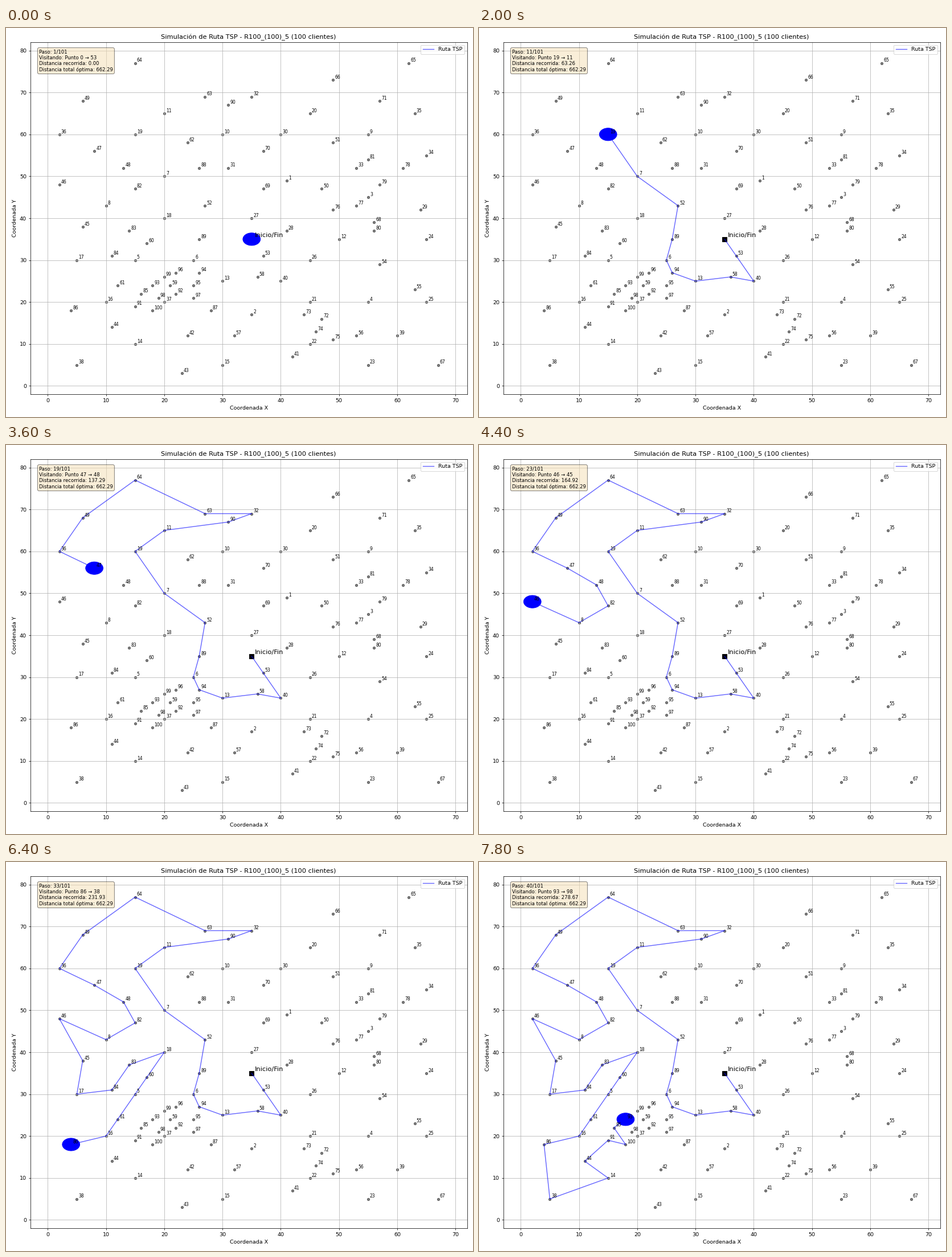
A matplotlib script for the animation above (8000 ms loop, 820 by 683 pixels).

```python
import matplotlib.pyplot as plt
import numpy as np
from matplotlib.animation import FuncAnimation
from matplotlib.patches import Circle

W, H, DPI = 820, 683, 820 / 12
STEPS, STEP_MS = 40, 200
TOTAL = 662.29

# Depot first, then customers 1 to 100
XS = [35,
      41, 35, 55, 55, 15, 25, 20, 10, 55, 30,
      20, 50, 30, 15, 30, 10, 5, 20, 15, 45,
      45, 45, 55, 65, 65, 45, 35, 41, 64, 40,
      31, 35, 53, 65, 63, 2, 20, 5, 60, 40,
      42, 24, 23, 11, 6, 2, 8, 13, 6, 47,
      49, 27, 37, 57, 63, 53, 32, 36, 21, 17,
      12, 24, 27, 15, 62, 49, 67, 56, 37, 37,
      57, 47, 44, 46, 49, 49, 53, 61, 57, 56,
      55, 15, 14, 11, 16, 4, 28, 26, 26, 31,
      15, 22, 18, 26, 25, 22, 25, 19, 20, 18]
YS = [35,
      49, 17, 45, 20, 30, 30, 50, 43, 60, 60,
      65, 35, 25, 10, 5, 20, 30, 40, 60, 65,
      20, 10, 5, 35, 20, 30, 40, 37, 42, 60,
      52, 69, 52, 55, 65, 60, 20, 5, 12, 25,
      7, 12, 3, 14, 38, 48, 56, 52, 68, 47,
      58, 43, 31, 29, 23, 12, 12, 26, 24, 34,
      24, 58, 69, 77, 77, 73, 5, 39, 47, 56,
      68, 16, 17, 13, 11, 42, 43, 52, 48, 37,
      54, 47, 37, 31, 22, 18, 18, 52, 35, 67,
      19, 22, 24, 27, 24, 27, 21, 21, 26, 18]
ROUTE = [0, 53, 40, 58, 13, 94, 6, 89, 52, 7, 19, 11, 90, 32, 63, 64, 49,
         36, 47, 48, 82, 8, 46, 45, 17, 84, 83, 18, 60, 5, 61, 16, 86, 38,
         14, 44, 91, 100, 85, 93, 98]

points = np.column_stack([XS, YS])
path = points[ROUTE]
legs = np.hypot(*np.diff(path, axis=0).T)
travelled = np.concatenate([[0], np.cumsum(legs)])

plt.rcParams["font.family"] = "DejaVu Sans"
fig = plt.figure(figsize=((W + 1e-6) / DPI, (H + 1e-6) / DPI), dpi=DPI)
left, right, top, bottom = 42.6, 809.75, 24.8, 643.2
ax = fig.add_axes([left / W, 1 - bottom / H,
                   (right - left) / W, (bottom - top) / H])
ax.set_xlim(-3, 72)
ax.set_ylim(-2, 82)
ax.set_title("Simulación de Ruta TSP - R100_(100)_5 (100 clientes)")
ax.set_xlabel("Coordenada X")
ax.set_ylabel("Coordenada Y")
ax.grid(True)

ax.scatter(XS[1:], YS[1:], c="black", s=20, alpha=0.5)
for n, (x, y) in enumerate(points[1:], 1):
    ax.text(x + 0.3, y + 0.3, str(n), fontsize=8)
ax.plot(*points[0], "ks", markersize=8)
ax.text(points[0, 0] + 0.5, points[0, 1] + 0.5, "Inicio/Fin", fontsize=12)

line, = ax.plot([], [], "b-", lw=1.5, alpha=0.6, label="Ruta TSP")
vehicle = ax.add_patch(Circle(points[0], 1.5, color="blue", zorder=2.5))
info = ax.text(0.02, 0.98, "", transform=ax.transAxes, fontsize=9, va="top",
               bbox=dict(boxstyle="round", facecolor="wheat", alpha=0.5))
ax.legend(loc="upper right")


def update(k):
    line.set_data(*path[:k + 1].T)
    vehicle.center = path[k]
    info.set_text(f"Paso: {k + 1}/101\n"
                  f"Visitando: Punto {ROUTE[k]} → {ROUTE[k + 1]}\n"
                  f"Distancia recorrida: {travelled[k]:.2f}\n"
                  f"Distancia total óptima: {TOTAL:.2f}")
    return line, vehicle, info


anim = FuncAnimation(fig, update, frames=STEPS, interval=STEP_MS,
                     init_func=lambda: update(0), repeat=True, repeat_delay=0)
plt.show()
```
